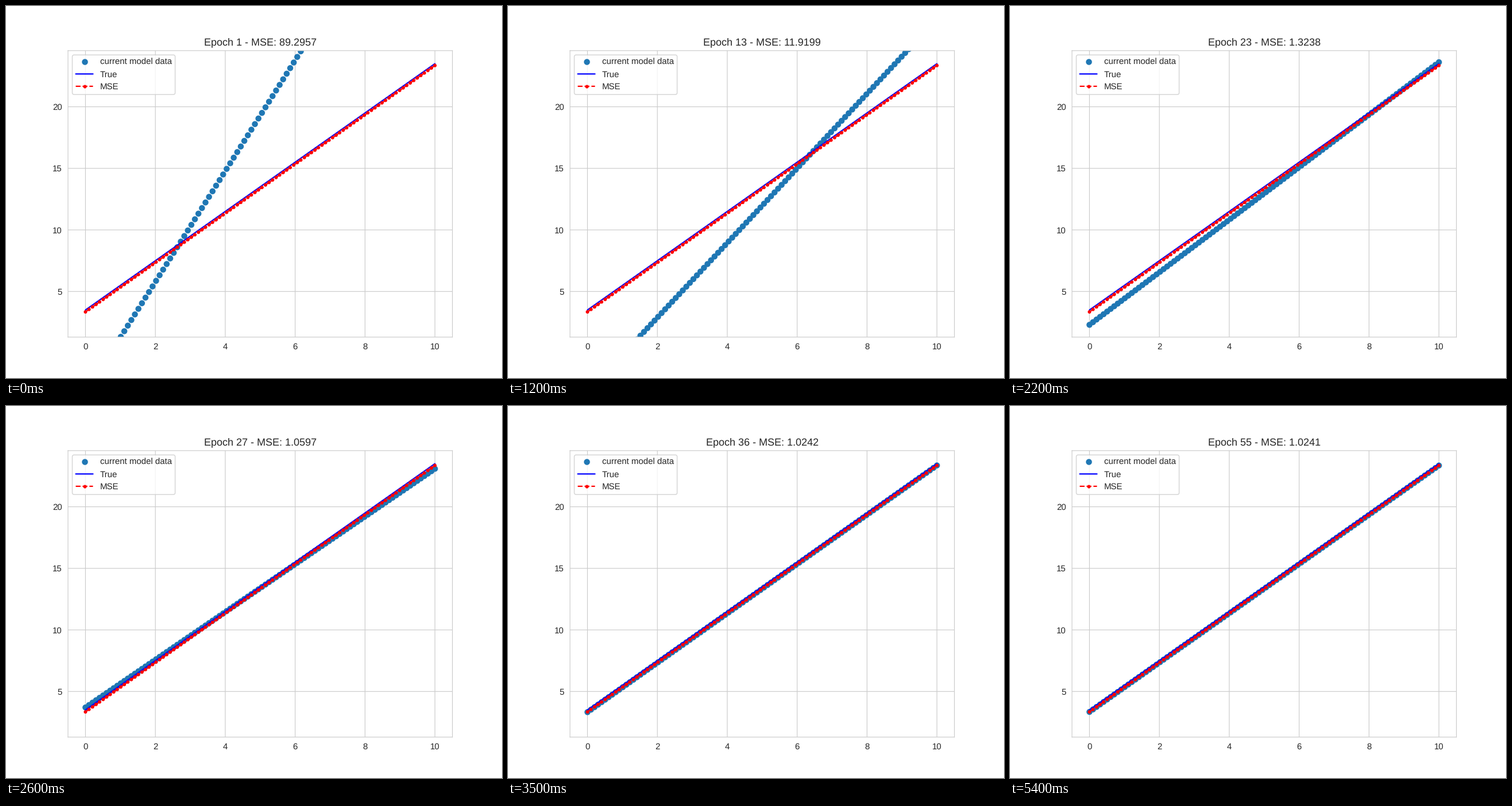
A matplotlib script that plays this animation: 864 px wide and 648 px high, repeating every 5.5 s.

```python
import numpy as np
import matplotlib.pyplot as plt
from matplotlib.animation import FuncAnimation

EPOCHS = 55
BEST_SLOPE, BEST_BIAS = 2.0005717, 3.3425196
NOISE = 1.0241
GREY, INK = "0.8", "0.15"

plt.rcParams.update({
    "font.family": "Liberation Sans",
    "text.color": INK, "text.hinting": "none",
    "xtick.color": INK, "ytick.color": INK,
    "xtick.bottom": False, "ytick.left": False,
    "axes.edgecolor": GREY, "axes.axisbelow": True,
    "axes.grid": True, "grid.color": GREY, "grid.linestyle": "-",
    "lines.solid_capstyle": "round",
    "path.snap": False,
})

x = np.linspace(0, 10, 100)


def mse(params):
    """Mean squared error of a line, measured from the best fit."""
    gap = (params[0] - BEST_SLOPE) * x + params[1] - BEST_BIAS
    return np.mean(gap ** 2) + NOISE


def nelder_mead(start, steps):
    """Best (slope, bias) after each simplex step."""
    simplex = [np.array(start, float)]
    for i in range(len(start)):
        corner = simplex[0].copy()
        corner[i] *= 1.05
        simplex.append(corner)
    simplex.sort(key=mse)

    path = []
    for _ in range(steps):
        best, second, worst = simplex
        center = (best + second) / 2

        def along(t):
            return center + t * (center - worst)

        reflected = along(1)
        err = mse(reflected)
        if err < mse(best):
            new = min(reflected, along(2), key=mse)
        elif err < mse(second):
            new = reflected
        elif err < mse(worst):
            new = along(0.5) if mse(along(0.5)) <= err else None
        else:
            new = along(-0.5) if mse(along(-0.5)) < mse(worst) else None

        if new is None:
            simplex = [best, (best + second) / 2, (best + worst) / 2]
        else:
            simplex = [best, second, new]
        simplex.sort(key=mse)
        path.append(simplex[0])
    return path


def line_points(slope, bias):
    return np.column_stack([x, slope * x + bias])


def dots(slope, bias, size, color, zorder):
    # One size per dot keeps the dots at sub-pixel positions.
    return ax.scatter(*line_points(slope, bias).T, s=np.full(x.size, size ** 2),
                      color=color, linewidths=1, zorder=zorder)


path = nelder_mead((5, -3), EPOCHS)

fig, ax = plt.subplots(figsize=(8, 6), dpi=108)
model = dots(*path[0], 6, "#1f77b4", 1.5)
ax.plot([], [], "o", color="#1f77b4", label="current model data")
ax.plot(x, 2 * x + 3.5, "b-", label="True")
ax.plot(x, BEST_SLOPE * x + BEST_BIAS, "r--")
dots(BEST_SLOPE, BEST_BIAS, 3, "r", 3)
ax.plot([], [], "r.--", label="MSE")
ax.set_xlim(-0.5, 10.5)
ax.set_ylim(1.298, 24.557)
ax.set_xticks(range(0, 11, 2))
ax.set_yticks(range(5, 21, 5))
ax.legend(loc="upper left")
title = ax.set_title("")


def draw(i):
    model.set_offsets(line_points(*path[i]))
    title.set_text(f"Epoch {i + 1} - MSE: {mse(path[i]):.4f}")
    return model, title


anim = FuncAnimation(fig, draw, frames=EPOCHS, interval=100, repeat=True)
plt.show()
```
